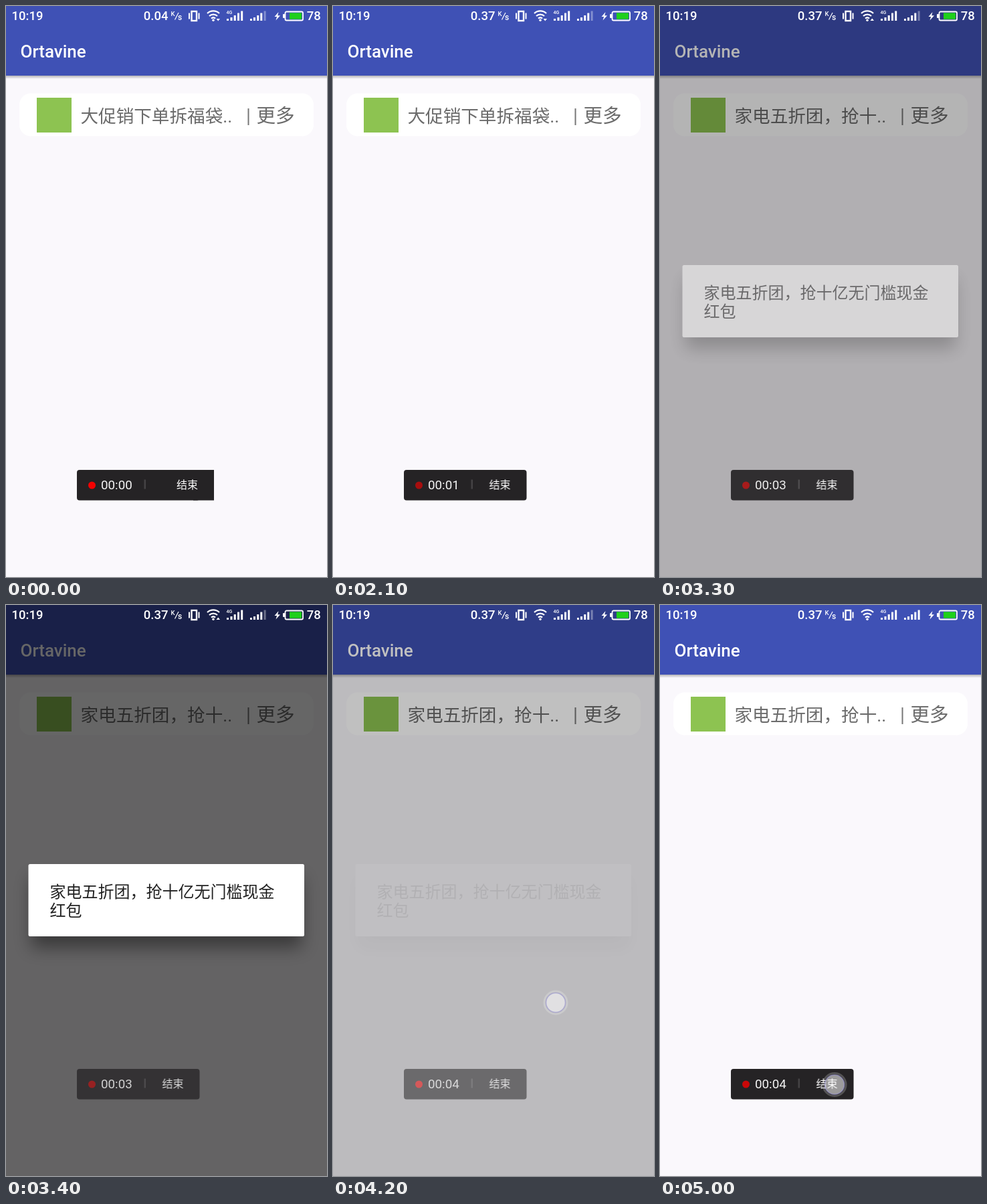
Write an HTML page that moves like this. It is 480x853 px and loops after 5100 ms.

```html
<!DOCTYPE html>
<html lang="zh-CN">
<head>
<meta charset="utf-8">
<title>Notice ticker</title>
<style>
  html, body { margin: 0; width: 100%; height: 100%; overflow: hidden; background: #faf8fc; }
  svg { display: block; }
  text { font-family: Roboto, "Noto Sans CJK SC", "Noto Sans CJK", "Noto Sans CJK JP", sans-serif; }
  .status text { font-size: 18.5px; font-weight: 500; }
  .ticker text { font-size: 26.6px; fill: #6b6b6b; }

  /* One loop is 5100 ms, so 1% is 51 ms. */
  .anim { animation: 5100ms linear infinite; }
  .hard { animation-timing-function: step-end; }

  .speed { animation-name: speed; }
  @keyframes speed { 0% { transform: none; } 38.82%, 100% { transform: translateY(-30px); } }

  .down { animation-name: down; }
  @keyframes down { 0%, 31% { opacity: 1; } 24%, 51%, 100% { opacity: 0; } }
  .up { animation-name: up; }
  @keyframes up { 0%, 76%, 100% { opacity: 0; } 51% { opacity: 1; } }

  .signal { animation-name: signal; }
  @keyframes signal { 0% { opacity: .35; } 95.7%, 100% { opacity: 1; } }

  .flip { animation-name: flip; }
  @keyframes flip {
    0%, 44.1% { transform: none; animation-timing-function: ease-in-out; }
    53.9%, 100% { transform: translateY(-63px); }
  }

  .dim { animation-name: dim; }
  @keyframes dim {
    0%, 63.3% { opacity: 0; }
    66.2%, 80.4% { opacity: .6; }
    82.35% { opacity: .25; }
    83.8%, 100% { opacity: 0; }
  }
  .dialog { animation-name: dialog; }
  @keyframes dialog {
    0%, 63.3% { opacity: 0; }
    66.2%, 80.4% { opacity: 1; }
    82.35% { opacity: .07; }
    82.6%, 100% { opacity: 0; }
  }

  .recorder { animation-name: recorder; }
  @keyframes recorder {
    0%, 63.7% { opacity: 1; }
    66.67% { opacity: .76; }
    69.6%, 94.2% { opacity: .53; }
    95.7%, 100% { opacity: 1; }
  }
  .wide { animation-name: wide; }
  @keyframes wide { 0% { opacity: 1; } 3.9%, 100% { opacity: 0; } }
  .label { animation-name: label; }
  @keyframes label { 0% { transform: translateX(21.5px); } 3.9%, 100% { transform: none; } }

  .count { animation-name: count; }
  @keyframes count {
    0% { transform: none; }
    23.14% { transform: translateY(-40px); }
    42.75% { transform: translateY(-80px); }
    62.35% { transform: translateY(-120px); }
    81.96%, 100% { transform: translateY(-160px); }
  }
  .blink { animation-name: blink; }
  @keyframes blink {
    0% { opacity: .95; }
    .98%, 12.75%, 24.51%, 36.27%, 48.04%, 59.8%, 71.57%, 83.33%, 95.1% { opacity: 1; }
    6.86%, 18.63%, 30.39%, 42.16%, 53.92%, 65.69%, 77.45%, 89.22% { opacity: .52; }
    100% { opacity: .6; }
  }

  .open { animation-name: open; }
  @keyframes open { 0%, 58.8% { opacity: 0; } 59.8%, 61.2% { opacity: .9; } 62.75% { opacity: .4; } 64%, 100% { opacity: 0; } }
  .close { animation-name: close; }
  @keyframes close { 0%, 78.4% { opacity: 0; } 79.4%, 82.4% { opacity: 1; } 85.3%, 100% { opacity: 0; } }
  .stop { animation-name: stop; }
  @keyframes stop { 0%, 95.1% { opacity: 0; } 96.1%, 100% { opacity: 1; } }
</style>
</head>
<body>
<svg width="480" height="853" viewBox="0 0 480 853">
  <defs>
    <linearGradient id="edge" x2="0" y2="1">
      <stop stop-color="#000" stop-opacity=".28"/>
      <stop offset="1" stop-color="#000" stop-opacity="0"/>
    </linearGradient>
    <filter id="soft" x="-20%" y="-50%" width="140%" height="220%">
      <feGaussianBlur stdDeviation="13"/>
    </filter>
    <g id="touch">
      <circle r="17" fill="none" stroke="#fff" stroke-opacity=".22" stroke-width="3"/>
      <circle r="14.5" fill="#fff" fill-opacity=".55" stroke="#a09bd0" stroke-opacity=".7" stroke-width="1.6"/>
    </g>
  </defs>

  <rect width="480" height="853" fill="#faf8fc"/>
  <rect width="480" height="104" fill="#3f51b5"/>
  <rect y="104" width="480" height="5" fill="url(#edge)"/>
  <text x="21.5" y="77" font-size="26" font-weight="500" fill="#fff">Ortavine</text>

  <rect x="20" y="130.5" width="440" height="64" rx="17" fill="#fff"/>
  <svg class="ticker" y="131" width="345" height="63">
    <g class="anim flip">
      <rect x="46" y="6" width="52" height="52" fill="#8dc351"/>
      <text x="111.5" y="42.5">大促销下单拆福袋..</text>
      <rect x="46" y="69" width="52" height="52" fill="#8dc351"/>
      <text x="111.5" y="105.5">家电五折团，抢十..</text>
    </g>
  </svg>
  <rect x="361.5" y="153" width="2" height="25" fill="#777"/>
  <text x="374.5" y="174" font-size="28.6" fill="#6b6b6b">更多</text>

  <rect class="anim dim" width="480" height="853"/>

  <g class="anim dialog">
    <rect x="38" y="408" width="404" height="104" opacity=".42" filter="url(#soft)"/>
    <rect x="33.5" y="387" width="412.5" height="108" rx="2.5" fill="#fff"/>
    <g font-size="24" fill="#212121">
      <text x="65.5" y="437">家电五折团，抢十亿无门槛现金</text>
      <text x="65.5" y="465">红包</text>
    </g>
  </g>

  <g class="anim recorder">
    <rect x="106" y="693" width="183.5" height="45.5" rx="4" fill="#252325"/>
    <rect class="anim hard wide" x="280" y="693" width="31" height="45.5" fill="#252325"/>
    <circle class="anim blink" cx="128.5" cy="716" r="5.5" fill="#f00"/>
    <svg x="140" y="700" width="56" height="32">
      <g class="anim hard count" font-size="18.8" fill="#f4f4f4">
        <text x="2" y="22">00:00</text>
        <text x="2" y="62">00:01</text>
        <text x="2" y="102">00:02</text>
        <text x="2" y="142">00:03</text>
        <text x="2" y="182">00:04</text>
      </g>
    </svg>
    <rect x="206.5" y="707.5" width="2.5" height="14" fill="#454345"/>
    <text class="anim hard label" x="233.5" y="720.5" font-size="16" fill="#fff">结束</text>
  </g>

  <g class="status" fill="#fff">
    <text x="8.5" y="21.3">10:19</text>
    <svg x="200" width="45" height="28">
      <g class="anim hard speed">
        <text x="5.8" y="21.3">0.04</text>
        <text x="5.8" y="51.3">0.37</text>
      </g>
    </svg>
    <text x="246.5" y="14.5" style="font-size:9.5px">K</text>
    <path d="M252.5 20.5L258 10" stroke="#fff" stroke-width="1.2"/>
    <text x="257" y="21.3" style="font-size:12px">s</text>

    <g fill="none" stroke="#fff" stroke-width="2">
      <rect x="277.5" y="8" width="7.5" height="14" stroke-width="2.4"/>
      <path d="M274 10.5v9M288.5 10.5v9"/>
      <path d="M301 11a13 13 0 0 1 18 0M304 15a8.6 8.6 0 0 1 12 0M307 18.6a4.5 4.5 0 0 1 6 0" stroke-width="2.3"/>
    </g>
    <circle cx="310" cy="21.2" r="1.7"/>
    <path class="anim hard down" d="M314.5 19h5.5l-2.75 3.5z"/>
    <path class="anim hard up" d="M314.5 22h5.5l-2.75-3.5z"/>

    <text x="329.5" y="12" style="font-size:7px">4G</text>
    <path d="M330 19h3v3h-3zM335.5 17h3v5h-3zM340.7 14h3v8h-3zM346 10.5h3v11.5h-3zM351.2 7.5h3v14.5h-3z"/>
    <path d="M365 19h3v3h-3zM370 17h3v5h-3zM375.2 14h3v8h-3zM380.3 10.5h3v11.5h-3z"/>
    <rect class="anim hard signal" x="385.6" y="7.5" width="3" height="14.5"/>

    <path d="M407.5 9l-6 7h3.6l-1.6 5.5 6.5-7.3h-3.8z"/>
    <rect x="414" y="12" width="3" height="6" rx="1"/>
    <rect x="417.5" y="8.5" width="26.5" height="13" rx="2" fill="none" stroke="#fff" stroke-width="1.8"/>
    <rect x="424" y="10.3" width="18" height="9.4" fill="#1fd01a"/>
    <text x="449.7" y="21.3">78</text>
  </g>

  <g class="anim open"><use href="#touch" x="229" y="167"/></g>
  <g class="anim close"><use href="#touch" x="333" y="594"/></g>
  <g class="anim stop"><use href="#touch" x="261" y="716.5"/></g>
</svg>
</body>
</html>
```
